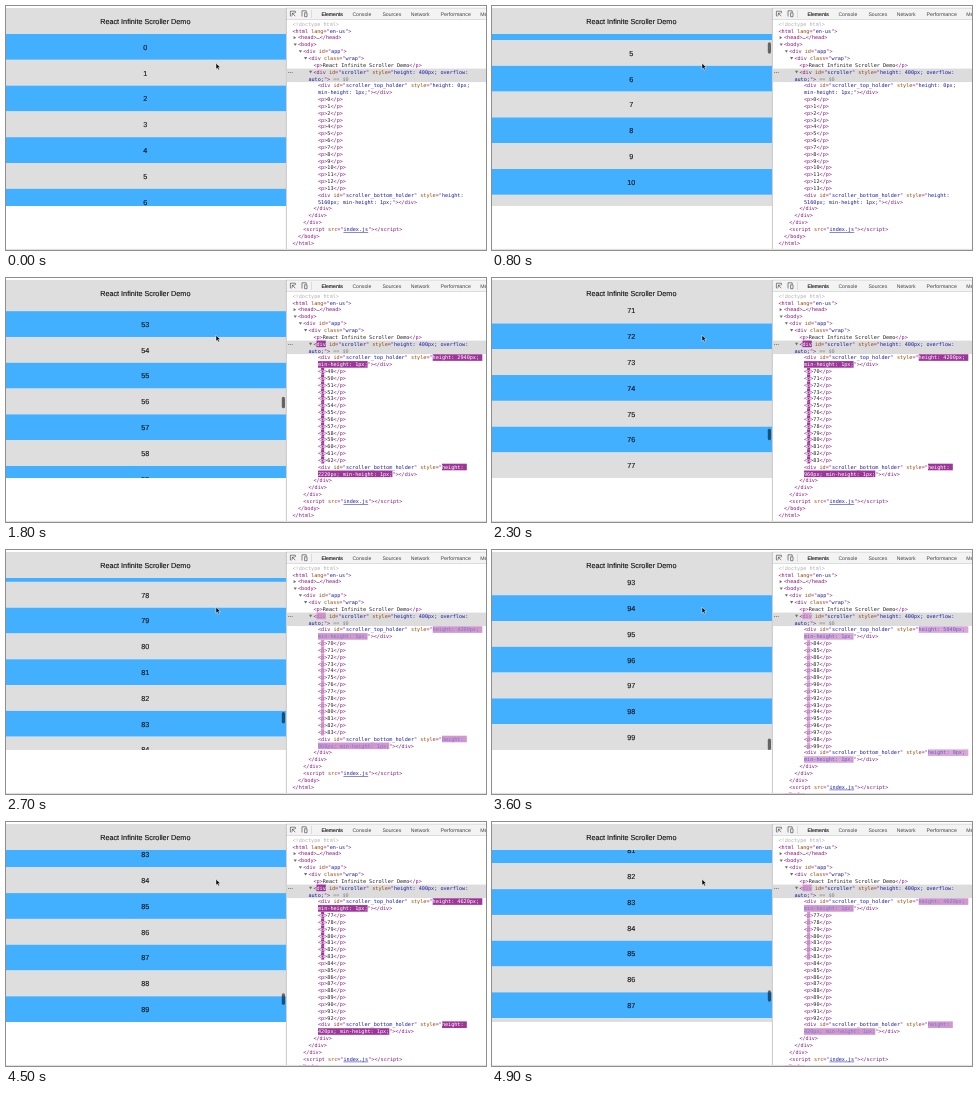
An HTML page for the animation above (5 s loop, 480 by 244 pixels).

```html
<!DOCTYPE html>
<html lang="en">
<head>
<meta charset="utf-8">
<title>Infinite scroller</title>
<style>
  html, body { margin: 0; width: 100%; height: 100%; overflow: hidden; background: #fff; }
  svg { display: block; width: 100vw; height: 100vh; text-rendering: geometricPrecision; }
  .page { font: 7.25px "Liberation Sans", Arial, sans-serif; text-anchor: middle; fill: #111; }
  .page text { stroke: #111; stroke-width: .12; }
  .tabs { font: 5.15px "Liberation Sans", Arial, sans-serif; fill: #444; }
  .tabs .active { fill: #222; stroke: #222; stroke-width: .15; }
  .code { font: 5.15px "DejaVu Sans Mono", Menlo, monospace; }
  .code text { white-space: pre; }
</style>
</head>
<body>
<svg viewBox="0 0 480 244" xmlns="http://www.w3.org/2000/svg">
  <defs><clipPath id="view"><rect y="28" width="280" height="172"/></clipPath></defs>
  <rect width="480" height="244" fill="#fff"/>

  <g class="page">
    <rect y="2" width="280" height="26" fill="#dedede"/>
    <text x="139.3" y="18">React Infinite Scroller Demo</text>
    <g id="rows" clip-path="url(#view)"></g>
    <rect id="thumb" x="275.8" width="3.2" height="11.5" rx="1.6" fill="#000"/>
  </g>

  <path d="M210 57.2v6l1.4-1.3 1 2.2 1.1-.5-1-2.1h1.8z" fill="#000" stroke="#fff" stroke-width=".5"/>

  <rect x="280" y="2" width="200" height="11.5" fill="#f3f3f3"/>
  <path d="M280 2.2H480M280 13.5H480M305.5 4v8" stroke="#ccc" stroke-width=".6"/>
  <path d="M280.4 2V243" stroke="#bbb" stroke-width=".8"/>
  <g fill="none" stroke="#555" stroke-width=".7">
    <path d="M285.6 10h-1.2V5.2h5V7"/>
    <path d="M286.3 7.2l3 3M286.3 9.6V7.2h2.4"/>
    <path d="M296 10.5V4.8h4.2v1.4M298.6 6.8h2.4v3.9h-2.4z"/>
  </g>
  <g class="tabs">
    <text class="active" x="315.4" y="9.8">Elements</text>
    <text x="346.4" y="9.8">Console</text>
    <text x="376.4" y="9.8">Sources</text>
    <text x="404.8" y="9.8">Network</text>
    <text x="434.5" y="9.8" font-size="5.3">Performance</text>
    <text x="474.2" y="9.8">Memory</text>
  </g>

  <rect x="280.8" y="62.6" width="199.2" height="13.5" fill="#dcdcdc"/>
  <g fill="#777"><circle cx="282.6" cy="66.5" r=".6"/><circle cx="284.4" cy="66.5" r=".6"/><circle cx="286.2" cy="66.5" r=".6"/></g>
  <g id="code" class="code"></g>
  <path d="M0 243.4H480" stroke="#d4d4d4" stroke-width=".8"/>
</svg>
<script>
const LOOP = 5000, STEP = 100, LAG = 60;
const ITEMS = 100, ROW = 60, BATCH = 7, SCALE = 0.43, TOP = 28;
const CHAR = 5.15 * 0.602, LINE = 6.84, MAX_COLS = 53;

// Scroll offset in page pixels over time.
const KEYS = [[0, 0], [250, 0], [800, 286], [1800, 3168], [2240, 4200], [2700, 4671],
  [3040, 5040], [3450, 5600], [4250, 5600], [4440, 5030], [4900, 4889], [5000, 4870]];

const secant = i => (KEYS[i + 1][1] - KEYS[i][1]) / (KEYS[i + 1][0] - KEYS[i][0]);

function slope(i) {
  if (i === 0 || i === KEYS.length - 1) return 0;
  const a = secant(i - 1), b = secant(i);
  return a * b > 0 ? 2 * a * b / (a + b) : 0;
}

// Monotone cubic interpolation.
function scrollAt(t) {
  if (t <= 0) return 0;
  let i = 0;
  while (i < KEYS.length - 2 && KEYS[i + 1][0] <= t) i++;
  const [t0, a] = KEYS[i], [t1, b] = KEYS[i + 1];
  const d = t1 - t0, u = (t - t0) / d, v = 1 - u;
  return a * (1 + 2 * u) * v * v + b * u * u * (3 - 2 * u)
    + d * u * v * (slope(i) * v - slope(i + 1) * u);
}

const firstItem = offset => Math.min(84, BATCH * Math.floor(offset / (BATCH * ROW)));

// Items listed in the inspector, which trails the page a little.
// Scrolling down touches every item, scrolling up only those before freshEnd.
const windows = [];
for (let t = 0, first = 0, count = 14, changed = -Infinity, freshEnd = 0; t < LOOP; t += STEP) {
  const next = firstItem(scrollAt(t - LAG));
  if (next !== first) {
    freshEnd = next > first ? ITEMS : first;
    first = next;
    changed = t;
  }
  if (first === 84) count = 16;
  windows.push({ first, count, freshEnd, age: t - changed });
}

const COLORS = {
  t: [136, 18, 128], a: [153, 69, 0], v: [26, 26, 166], l: [26, 26, 166],
  k: [34, 34, 34], g: [176, 176, 176], s: [130, 130, 130]
};
const clamp = x => Math.max(0, Math.min(1, x));
const mix = (a, b, k) => `rgb(${a.map((x, i) => Math.round(x + (b[i] - x) * k))})`;
const esc = s => s.replace(/&/g, '&amp;').replace(/</g, '&lt;');

// A run is a colour letter followed by text; a capital letter marks a flashing run.
const attr = (name, value) => ['a ' + name, 't="', 'v' + value, 't"'];
const open = (name, ...attrs) => ['t<' + name, ...attrs, 't>'];

function holder(id, height) {
  const head = ['t<div', ...attr('id', id), 'a style', 't="'];
  const cols = head.reduce((n, run) => n + run.length - 1, 0);
  const size = `${height}px; `;
  const fits = cols + 8 + size.trim().length <= MAX_COLS;
  return [
    { x: 312, runs: [...head, 'Vheight: ' + (fits ? size : '')] },
    { x: 312, runs: ['V' + (fits ? '' : size) + 'min-height: 1px;', 't"></div>'] }
  ];
}

function codeLines({ first, count, freshEnd }) {
  const items = Array.from({ length: count }, (_, i) => {
    const n = first + i;
    return { x: 312, runs: ['t<', n < freshEnd ? 'Tp' : 'tp', 't>', 'k' + n, 't</p>'] };
  });
  return [
    { x: 286.5, runs: ['g<!doctype html>'] },
    { x: 286.5, runs: open('html', ...attr('lang', 'en-us')) },
    { x: 292, arrow: 'right', runs: ['t<head>', 'k…', 't</head>'] },
    { x: 292, arrow: 'down', runs: open('body') },
    { x: 297.2, arrow: 'down', runs: open('div', ...attr('id', 'app')) },
    { x: 302.4, arrow: 'down', runs: open('div', ...attr('class', 'wrap')) },
    { x: 307.4, runs: ['t<p>', 'kReact Infinite Scroller Demo', 't</p>'] },
    { x: 307.4, arrow: 'down', runs: ['t<', 'Tdiv', ...attr('id', 'scroller'),
      'a style', 't="', 'vheight: 400px; overflow:'] },
    { x: 302.4, runs: ['vauto;', 't">', 's == $0'] },
    ...holder('scroller_top_holder', first * ROW),
    ...items,
    ...holder('scroller_bottom_holder', (ITEMS - first - count) * ROW),
    { x: 307.4, runs: ['t</div>'] },
    { x: 302.4, runs: ['t</div>'] },
    { x: 297.2, runs: ['t</div>'] },
    { x: 297.2, runs: ['t<script', 'a src', 't="', 'lindex.js', 't"></' + 'script>'] },
    { x: 292, runs: ['t</body>'] },
    { x: 286.5, runs: ['t</html>'] }
  ];
}

function drawLine({ x, arrow, runs }, n, age) {
  const y = 18 + LINE * n;
  const k = 1 - (1 - clamp(age / 1120)) ** 2, fade = clamp((1400 - age) / 280);
  let col = 0, marks = '', spans = '';
  for (const run of runs) {
    const text = run.slice(1), kind = run[0].toLowerCase();
    const flash = run[0] !== kind && fade > 0;
    if (flash) {
      marks += `<rect x="${x + col * CHAR}" y="${y - 3.3}" width="${text.length * CHAR}" height="6.6"
        fill="${mix([158, 54, 153], [245, 219, 244], k)}" opacity="${fade}"/>`;
    }
    const fill = mix([255, 255, 255], COLORS[kind], flash ? k : 1);
    const line = kind === 'l' ? ' text-decoration="underline"' : '';
    spans += `<tspan fill="${fill}"${line}>${esc(text)}</tspan>`;
    col += text.length;
  }
  if (arrow) {
    const shape = arrow === 'down' ? 'h3.2l-1.6 2.6z' : 'v3.2l2.6-1.6z';
    const dy = arrow === 'down' ? 1.1 : 1.6;
    marks += `<path d="M${x - 4.4} ${y - dy}${shape}" fill="#6e6e6e"/>`;
  }
  return `${marks}<text x="${x}" y="${y + 1.8}">${spans}</text>`;
}

// Stripes follow the position among the rendered items, not the item number.
function drawRows(offset) {
  const from = Math.floor(offset / ROW), first = firstItem(offset);
  let out = '';
  for (let i = from; i < Math.min(ITEMS, from + 8); i++) {
    const y = TOP + (i * ROW - offset) * SCALE;
    out += `<rect y="${y}" width="280" height="25.85" fill="${(i - first) % 2 ? '#dedede' : '#42afff'}"/>
      <text x="139.3" y="${y + 15.7}">${i}</text>`;
  }
  return out;
}

const [rows, thumb, code] = ['rows', 'thumb', 'code'].map(id => document.getElementById(id));

function render(t) {
  const offset = scrollAt(t), win = windows[t / STEP];
  rows.innerHTML = drawRows(offset);
  thumb.setAttribute('y', TOP + offset / (ITEMS * ROW) * 172);
  const shown = t < 300 ? 0 : t < 4250 ? clamp((4200 - t) / 300) : 1;
  thumb.setAttribute('opacity', 0.55 * shown);
  code.innerHTML = codeLines(win).map((line, n) => drawLine(line, n, win.age)).join('');
}

const begin = performance.now();
let last = -1;
function tick() {
  const t = Math.floor((performance.now() - begin) % LOOP / STEP) * STEP;
  if (t !== last) render(last = t);
  requestAnimationFrame(tick);
}
tick();
</script>
</body>
</html>
```
